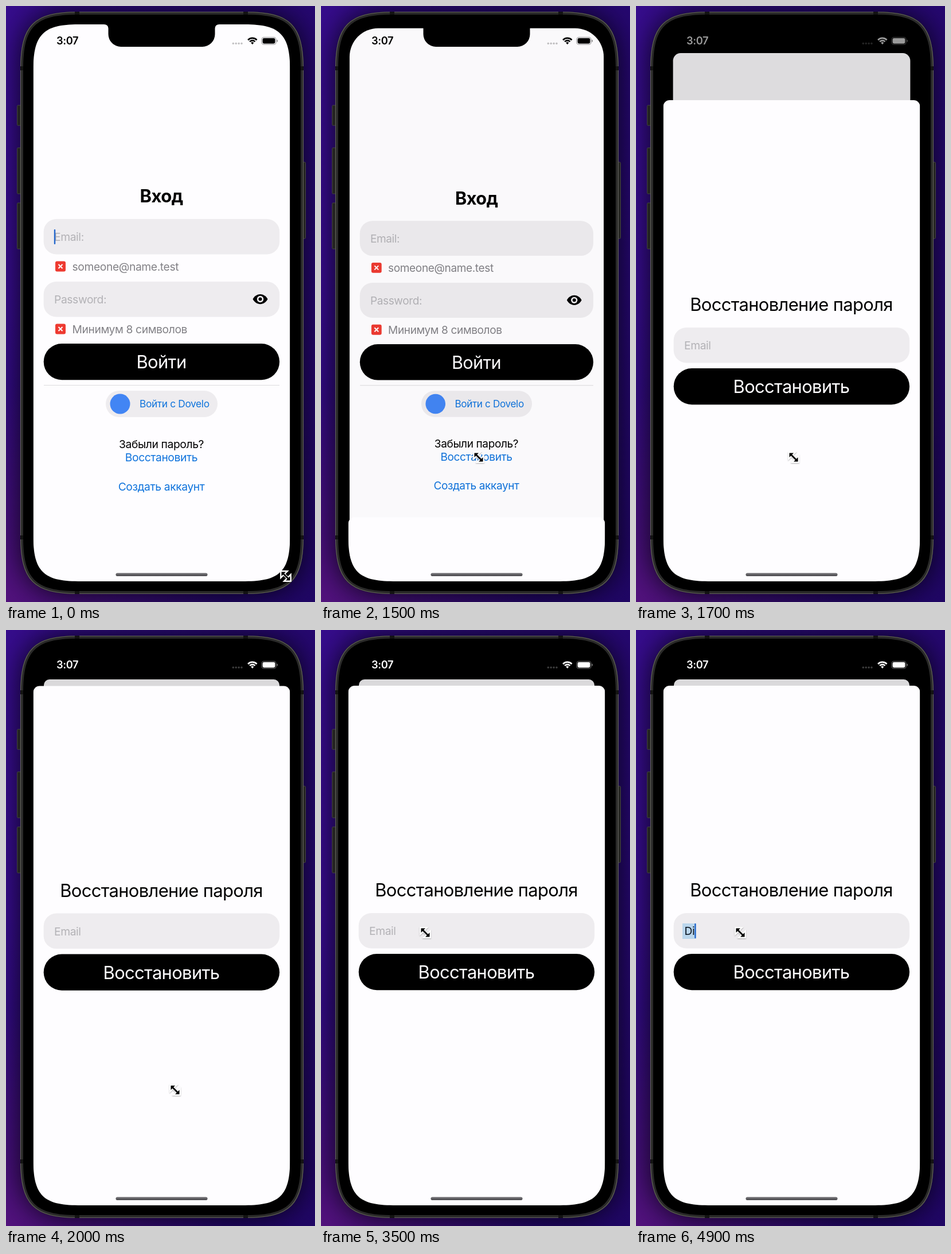
These frames come from a looping animation (539x1038 px, 5 s). An HTML page with a canvas:

```html
<!DOCTYPE html>
<html lang="ru">
<head>
<meta charset="utf-8">
<style>
html, body { margin: 0; width: 100%; height: 100%; overflow: hidden; background: #22086c; }
canvas { display: block; }
</style>
</head>
<body>
<canvas id="stage" width="539" height="1038"></canvas>
<script>
const W = 539, H = 1038, LOOP = 5000, STEP = 100;
const ctx = document.getElementById('stage').getContext('2d');
const SCREEN = { x: 47.6, y: 32, w: 447.8, h: 970, r: 56 };
const PAPER = '#fefdff', FIELD = '#eeecef', HINT = '#b3b2b6', GREY = '#828186';
const LINK = '#0f73dc', CARET = '#2467cc';
const BODY = 19.25, LARGE = 30.9;
const SHEET_TOP = 97, SHEET_START = 1467;

// time, x, y
const POINTER = [
  [0, 488, 993], [500, 372, 884], [1000, 275, 786], [1750, 275, 786],
  [2000, 295, 801], [2400, 208, 541], [2700, 190, 531], [3000, 185, 528], [3100, 182, 527]
];

const clamp = v => Math.max(0, Math.min(1, v));
const mix = (a, b, p) => a + (b - a) * p;

function box(x, y, w, h, r, fill) {
  ctx.beginPath();
  ctx.roundRect(x, y, w, h, r);
  if (fill) {
    ctx.fillStyle = fill;
    ctx.fill();
  }
}

// Rectangle with continuous-curvature corners
function smoothBox(x, y, w, h, r, fill) {
  const d = 1.4 * r, c = 0.315 * r, x1 = x + w, y1 = y + h;
  ctx.beginPath();
  ctx.moveTo(x + d, y);
  ctx.lineTo(x1 - d, y);
  ctx.bezierCurveTo(x1 - c, y, x1, y + c, x1, y + d);
  ctx.lineTo(x1, y1 - d);
  ctx.bezierCurveTo(x1, y1 - c, x1 - c, y1, x1 - d, y1);
  ctx.lineTo(x + d, y1);
  ctx.bezierCurveTo(x + c, y1, x, y1 - c, x, y1 - d);
  ctx.lineTo(x, y + d);
  ctx.bezierCurveTo(x, y + c, x + c, y, x + d, y);
  ctx.closePath();
  if (fill) {
    ctx.fillStyle = fill;
    ctx.fill();
  }
}

function outline(color, width) {
  ctx.strokeStyle = color;
  ctx.lineWidth = width;
  ctx.stroke();
}

function text(str, x, y, size, color, align = 'left', weight = 400) {
  ctx.font = `${weight} ${size}px Inter, "Noto Sans", sans-serif`;
  ctx.letterSpacing = `${-0.02 * size}px`;
  ctx.textAlign = align;
  ctx.fillStyle = color;
  ctx.fillText(str, x, y);
}

function fade(g, ...colors) {
  colors.forEach((c, i) => g.addColorStop(i / (colors.length - 1), c));
  return g;
}

// Critically damped spring, 0 to 1
function sheetProgress(t) {
  const k = 0.0183 * Math.max(0, t - SHEET_START);
  return 1 - (1 + k) * Math.exp(-k);
}

function caretAlpha(t) {
  const ph = t % 1000;
  if (ph < 600) return clamp((500 - ph) / 250);
  return clamp((ph - 650) / 250);
}

function caret(x, y, alpha) {
  ctx.globalAlpha = alpha;
  box(x, y, 2.4, 26, 1, CARET);
  ctx.globalAlpha = 1;
}

function pointerAt(t) {
  let i = 0;
  while (i < POINTER.length - 2 && t > POINTER[i + 1][0]) i++;
  const [t0, x0, y0] = POINTER[i], [t1, x1, y1] = POINTER[i + 1];
  const p = clamp((t - t0) / (t1 - t0));
  return [mix(x0, x1, p), mix(y0, y1, p)];
}

function backdrop() {
  ctx.fillStyle = fade(ctx.createLinearGradient(0, 0, W, 0), '#360c8c', '#2b0a7c', '#25076f');
  ctx.fillRect(0, 0, W, H);
  ctx.fillStyle = fade(ctx.createLinearGradient(0, 500, 0, H), 'rgba(26,4,90,0)', 'rgba(26,4,90,.5)');
  ctx.fillRect(0, 500, W, H - 500);
  ctx.fillStyle = fade(ctx.createRadialGradient(0, H, 0, 0, H, 380), 'rgba(92,20,126,.8)', 'rgba(92,20,126,0)');
  ctx.fillRect(0, 600, 400, H - 600);
}

function phone() {
  ctx.save();
  ctx.shadowColor = 'rgba(0,0,0,.8)';
  ctx.shadowBlur = 48;
  smoothBox(25, 10, 494, 1014, 72, '#2a2a29');
  ctx.restore();
  for (const [x, y, w, h] of [[19.5, 173, 8, 35], [19.5, 247, 8, 80], [19.5, 343, 8, 80], [516, 272, 6.5, 133]]) {
    box(x, y, w, h, 1.5, '#232321');
    outline('#44443e', 1);
  }
  smoothBox(25, 10, 494, 1014, 72, '#2a2a29');
  smoothBox(25.5, 10.5, 493, 1013, 72);
  outline('#62625a', 1.2);
  ctx.fillStyle = '#141413';
  for (const y of [105, 922]) {
    ctx.fillRect(25, y, 6, 7);
    ctx.fillRect(513, y, 6, 7);
  }
  for (const x of [120, 414]) {
    ctx.fillRect(x, 10, 8, 5);
    ctx.fillRect(x, 1019, 8, 5);
  }
  smoothBox(30, 15, 484, 1004, 67, '#000');
}

function errorMark(y) {
  box(86, y - 9, 18, 18, 3, '#ee3a31');
  ctx.beginPath();
  for (const s of [-1, 1]) {
    ctx.moveTo(95 - 3.5, y - 3.5 * s);
    ctx.lineTo(95 + 3.5, y + 3.5 * s);
  }
  outline('#fff', 2);
}

function disc(x, y, r, fill) {
  ctx.beginPath();
  ctx.arc(x, y, r, 0, Math.PI * 2);
  ctx.fillStyle = fill;
  ctx.fill();
}

function eye(x, y) {
  ctx.beginPath();
  ctx.moveTo(x - 13, y);
  ctx.bezierCurveTo(x - 7, y - 11.5, x + 7, y - 11.5, x + 13, y);
  ctx.bezierCurveTo(x + 7, y + 11.5, x - 7, y + 11.5, x - 13, y);
  ctx.fillStyle = '#000';
  ctx.fill();
  disc(x, y, 5.7, FIELD);
  disc(x, y, 3, '#000');
}

function field(y) {
  box(65.7, y, 411.4, 61.5, 22, FIELD);
}

function bigButton(label, y) {
  box(65.7, y, 411.4, 63.2, 31.6, '#000');
  text(label, 271, y + 43, LARGE, '#fefdff', 'center');
}

function loginForm(t) {
  text('Вход', 271, 342, 31, '#000', 'center', 700);
  field(371);
  text('Email:', 84, 409, BODY, HINT);
  caret(83.8, 389, caretAlpha(t));
  errorMark(453.5);
  text('someone@name.test', 115.5, 460.5, BODY, GREY);
  field(480);
  text('Password:', 84, 518, BODY, HINT);
  eye(443.5, 510.5);
  errorMark(562.5);
  text('Минимум 8 символов', 115.5, 569.5, BODY, GREY);
  bigButton('Войти', 588);
  ctx.fillStyle = '#dcdbde';
  ctx.fillRect(66, 660, 411, 1);
  box(174, 670, 195, 46, 23, FIELD);
  disc(199, 693, 17.5, '#4285f4');
  text('Войти с Dovelo', 233, 699, 17.3, LINK);
  text('Забыли пароль?', 271, 770, BODY, '#000', 'center');
  ctx.globalAlpha = t >= 1300 && t < 1500 ? 0.4 : 1;
  text('Восстановить', 271, 793, BODY, LINK, 'center');
  ctx.globalAlpha = 1;
  text('Создать аккаунт', 271, 844, BODY, LINK, 'center');
}

function loginCard(t, p) {
  const { x, y, w, h, r } = SCREEN;
  const left = mix(x, 66, p), scale = (w - 2 * (left - x)) / w;
  ctx.save();
  ctx.translate(left, mix(y, 86, p));
  ctx.scale(scale, scale);
  box(0, 0, w, h, mix(r, 11, p), PAPER);
  ctx.clip();
  ctx.translate(-x, -y);
  loginForm(t);
  ctx.fillStyle = `rgba(0,0,0,${0.14 * p})`;
  ctx.fillRect(x, y, w, h);
  ctx.restore();
}

function recoverySheet(t, p) {
  const typed = t < 4500 ? '' : t < 4800 ? 'D' : 'Di';
  ctx.save();
  ctx.translate(0, mix(1002, SHEET_TOP, p));
  box(SCREEN.x, 0, SCREEN.w, 1000, [11, 11, 0, 0], PAPER);
  text('Восстановление пароля', 271, 367, LARGE, '#000', 'center');
  field(396);
  if (typed) {
    text(typed, 84.5, 434, BODY, '#000');
    const end = 85 + ctx.measureText(typed).width;
    box(81, 414, end - 79, 27, 0, '#bad6ec');
    text(typed, 84.5, 434, BODY, '#0a1420');
    caret(end - 0.6, 414, 1);
  } else {
    text('Email', 84, 434, BODY, HINT);
    if (t >= 2900) caret(84, 414, caretAlpha(t));
  }
  bigButton('Восстановить', 467);
  ctx.restore();
}

function notch() {
  ctx.beginPath();
  ctx.moveTo(171, 31);
  ctx.lineTo(171, 32);
  ctx.quadraticCurveTo(178, 32, 178.5, 39);
  ctx.lineTo(178.5, 48);
  ctx.arcTo(178.5, 71, 202, 71, 22);
  ctx.lineTo(342, 71);
  ctx.arcTo(364.5, 71, 364.5, 48, 22);
  ctx.lineTo(364.5, 39);
  ctx.quadraticCurveTo(365, 32, 372, 32);
  ctx.lineTo(372, 31);
  ctx.fillStyle = '#000';
  ctx.fill();
}

function statusBar(t) {
  const v = Math.round(255 * clamp((t - 1525) / 290));
  const ink = a => `rgba(${v},${v},${v},${a})`;
  text('3:07', 88, 67.3, 18.3, ink(1), 'left', 600);
  for (let i = 0; i < 4; i++) disc(396.3 + i * 4.9, 65.3, 1.7, ink(0.24));
  for (const r of [10.6, 6.4]) {
    ctx.beginPath();
    ctx.arc(429.8, 66.5, r, -Math.PI * 0.76, -Math.PI * 0.24);
    outline(ink(1), 2.6);
  }
  ctx.beginPath();
  ctx.moveTo(429.8, 67);
  ctx.arc(429.8, 66.5, 3.5, -Math.PI * 0.76, -Math.PI * 0.24);
  ctx.fillStyle = ink(1);
  ctx.fill();
  box(446, 54.5, 25, 12.5, 3.8);
  outline(ink(0.42), 1.1);
  box(447.6, 56.1, 21.8, 9.3, 2.4, ink(1));
  box(472.4, 58.8, 1.6, 4, 1, ink(0.45));
}

function pointer(x, y) {
  const heads = s => {
    ctx.moveTo(-7.5 * s, -7.5 * s);
    ctx.lineTo(0, -7.5 * s);
    ctx.lineTo(-7.5 * s, 0);
    ctx.closePath();
  };
  ctx.save();
  ctx.translate(x, y);
  ctx.shadowColor = 'rgba(0,0,0,.3)';
  ctx.shadowBlur = 2;
  ctx.shadowOffsetY = 1;
  ctx.beginPath();
  heads(1);
  heads(-1);
  ctx.moveTo(-4, -4);
  ctx.lineTo(4, 4);
  outline('#fff', 4.8);
  ctx.shadowColor = 'transparent';
  ctx.beginPath();
  heads(1);
  heads(-1);
  ctx.fillStyle = '#000';
  ctx.fill();
  ctx.beginPath();
  ctx.moveTo(-4, -4);
  ctx.lineTo(4, 4);
  outline('#000', 2.8);
  ctx.restore();
}

function draw(t) {
  const p = sheetProgress(t);
  backdrop();
  phone();
  ctx.save();
  smoothBox(SCREEN.x, SCREEN.y, SCREEN.w, SCREEN.h, SCREEN.r, '#000');
  ctx.clip();
  loginCard(t, p);
  if (p > 0) recoverySheet(t, p);
  box(191.5, 987.5, 160, 5.6, 2.8, fade(ctx.createLinearGradient(0, 987, 0, 993), '#7d7c80', '#48474b'));
  ctx.restore();
  notch();
  statusBar(t);
  pointer(...pointerAt(t));
}

const start = performance.now();
function tick() {
  const t = (performance.now() - start) % LOOP;
  draw(Math.floor(t / STEP) * STEP);
  requestAnimationFrame(tick);
}
tick();
</script>
</body>
</html>
```
